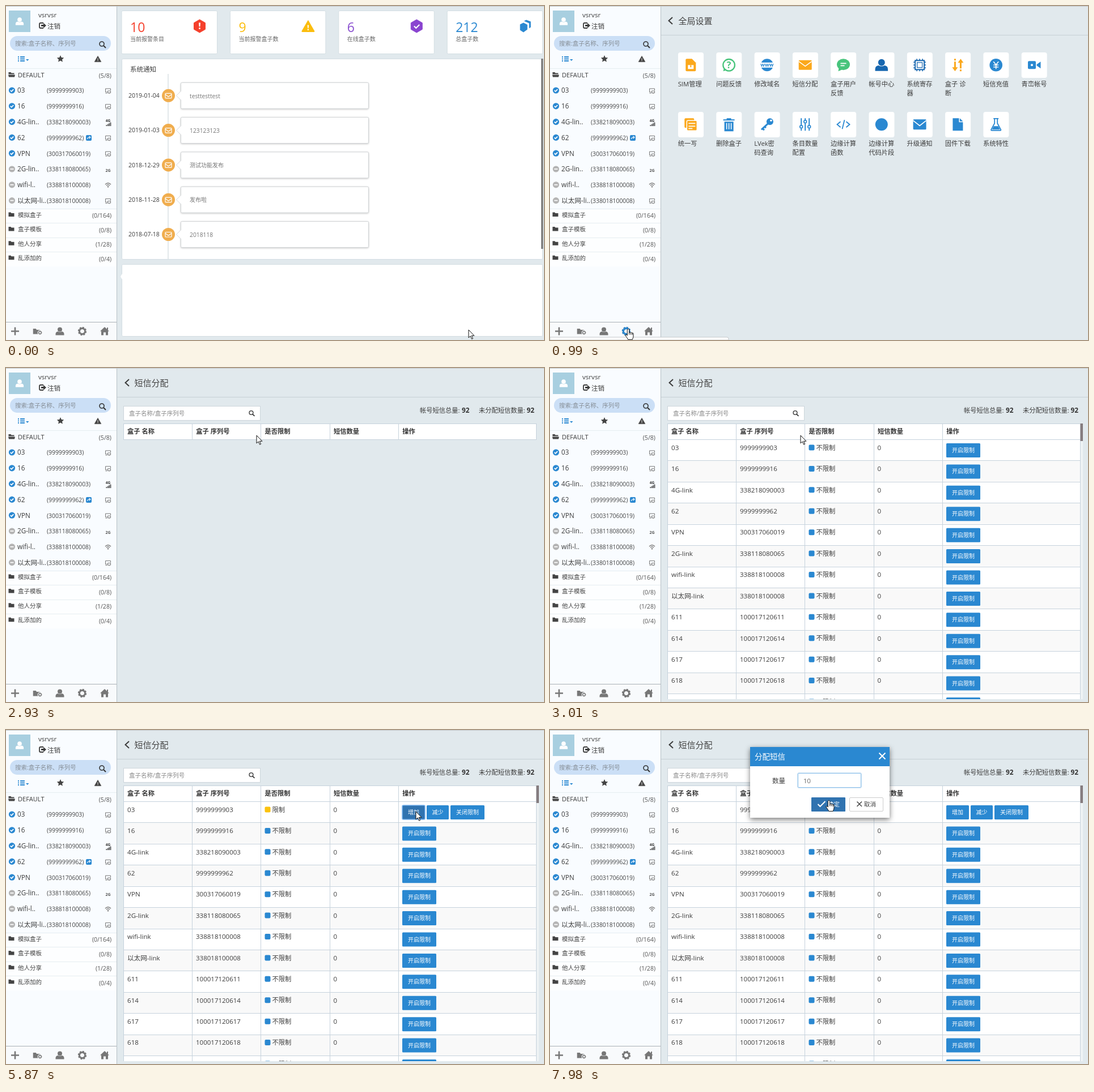
Animation, 949 px wide and 590 px high, one loop 8 s. Source, as an HTML page:

```html
<!DOCTYPE html>
<html lang="zh">
<head>
<meta charset="utf-8">
<title>短信分配</title>
<style>
html, body { margin: 0; width: 100%; height: 100%; overflow: hidden; background: #e1e9ed; }
svg { display: block; position: absolute; left: 0; top: 0; }
text { font-family: "Open Sans", "Noto Sans CJK SC", "Noto Sans CJK", sans-serif; white-space: pre; }
.line { fill: none; }
.card { fill: #fff; stroke: #d3dde2; }
.shade { filter: drop-shadow(0 1px 1.5px #0003); }
.deep { filter: drop-shadow(0 3px 5px #0008); }
</style>
</head>
<body>
<svg id="stage" width="949" height="590" viewBox="0 0 949 590"></svg>
<script>
const LOOP = 8000;
const BLUE = '#2a88d1', HOVER = '#3073b0', ORANGE = '#fba81c', GREEN = '#48c47c', INK = '#3c3c3c', GREY = '#777';

// Drawing helpers: text is placed by its vertical middle, icons by their centre.
const text = (x, y, s, size = 11.25, fill = INK, more = '') =>
  `<text x="${x}" y="${y + size * .37}" font-size="${size}" fill="${fill}" ${more}>${s}</text>`;
const rect = (x, y, w, h, fill, more = '') =>
  `<rect x="${x}" y="${y}" width="${w}" height="${h}" fill="${fill}" ${more}/>`;
const path = (d, fill, more = '') => `<path d="${d}" fill="${fill}" ${more}/>`;
const line = (d, color, width = 1, more = '') =>
  `<path class="line" d="${d}" stroke="${color}" stroke-width="${width}" ${more}/>`;
const disc = (r, fill, x = 0, y = 0) => `<circle cx="${x}" cy="${y}" r="${r}" fill="${fill}"/>`;
const ring = (r, color, width, more = '') =>
  `<circle class="line" r="${r}" stroke="${color}" stroke-width="${width}" ${more}/>`;
const at = (x, y, body, scale = 1) => `<g transform="translate(${x} ${y}) scale(${scale})">${body}</g>`;
const group = (id, body) => `<g id="${id}">${body}</g>`;
const MID = 'text-anchor="middle" ', END = 'text-anchor="end" ', BOLD = 'font-weight="700"';

// Icons
const gear = c => ring(5, c, 2.8) + ring(6.6, c, 2.2, 'stroke-dasharray="3.2 1.984"');
const user = c => disc(4, c, 0, -3) + path('M-7.500 7v-2q0-4 4-4.500q3.500 2 7 0q4 .5 4 4.500v2z', c);
const lens = c => ring(4, c, 1.6) + line('M3 3l4 4', c, 2);
const folder = c => path('M-5-4h4l1 1.500h5v6h-10z', c);
const mail = (w, h, fill, ink) => rect(-w / 2, -h / 2, w, h, fill, 'rx="1.500"') +
  line(`M${-w / 2} ${-h / 2 + 2}L0 ${h * .12}L${w / 2} ${-h / 2 + 2}`, ink, 1.5);
const back = (x, y) => line(`M${x + 7} ${y - 6}l-6.500 6l6.500 6`, INK, 2);
const alertMark = c => path('M-1.500-6h3l-.6 7h-1.800z', c) + disc(1.5, c, 0, 4);
const warn = (c, ink) => path('M0-10L11 9q.5 1-1 1h-20q-1.500 0-1-1z', c, `stroke="${c}" stroke-linejoin="round"`) + at(0, 3, alertMark(ink), .8);
const hexagon = c => path('M0-11.500L10-5.700V5.700L0 11.500L-10 5.700V-5.700z', c, `stroke="${c}" stroke-linejoin="round"`);
const screen = line('M-1.500 2.500h-3v-6h9v3M-4.500 4.500h3M-.5.500h5v3.500h-5zM2 4v1.500', GREY);
const wifi = line('M-5-1q5-5 10 0M-3 1q3-3 6 0', GREY, 1.3) + disc(1.2, GREY, 0, 3);
const mobile = text(0, -3, '4G', 6.5, '#333', MID + BOLD) +
  [0, 1, 2, 3].map(i => rect(-3.5 + i * 2.4, 5 - i * 1.5, 1.6, 2 + i * 1.5, '#444')).join('');
const slow = text(0, 2, '2G', 7, '#555', MID + BOLD);

const devices = [
  ['03', '9999999903', screen], ['16', '9999999916', screen],
  ['4G-link', '338218090003', mobile, '4G-lin..'], ['62', '9999999962', screen],
  ['VPN', '300317060019', screen], ['2G-link', '338118080065', slow, '2G-lin..'],
  ['wifi-link', '338818100008', wifi, 'wifi-l..'], ['以太网-link', '338018100008', screen, '以太网-li..'],
];

function sidebar() {
  let s = rect(0, 0, 195, 590, '#f9fcff') + line('M195.500 0V590', '#b7c0c6');
  s += rect(5, 8, 38, 38, '#a8cfe0') + at(24, 27, user('#fff'), .95);
  s += text(57, 16, 'vsrvsr', 11.6) + text(73, 36, '注销', 11.5);
  s += line('M66 30h-5q-2 0-2 2v5q0 2 2 2h5', INK, 1.8) + path('M62 33h4v-3l5 4.500l-5 4.500v-3h-4z', INK);
  s += rect(7, 53, 178, 26, '#cbdff6', 'rx="13"') + text(16, 66, '搜索:盒子名称、序列号', 10.5, '#858d95');
  s += at(169, 67, lens('#333'));
  s += line('M21 90h2M25 90h8M21 93.500h2M25 93.500h8M21 97h2M25 97h8', BLUE, 1.8) + path('M35 94h5.500l-2.700 3z', BLUE);
  s += path('M96 87l1.800 4l4.400.5l-3.200 3l.9 4.300l-3.900-2.200l-3.900 2.200l.9-4.300l-3.200-3l4.400-.5z', '#444');
  s += at(162, 93.5, warn('#444', '#fff'), .52);
  s += line('M0 110.500H195', '#e6edf1') + rect(0, 358, 195, 102, '#fdfeff');
  s += path('M4.500 117h4l1 1.500h5v2h-10zM4 121.500h12l-1 4h-10z', '#444');
  s += text(21, 122, 'DEFAULT', 11.1) + text(186, 123, '(5/8)', 10.6, '#555', END);
  devices.forEach(([name, serial, icon, brief], i) => {
    const y = 149 + 27.8 * i, on = i < 5;
    s += at(10.5, y, disc(5.6, on ? BLUE : '#b4b4b4') + line(on ? 'M-2.800 0l2 2l3.600-3.800' : 'M-3 0h6', '#fff', 1.7));
    s += text(20, y, brief || name, 11.7) + text(72, y + .5, `(${serial})`, 10.35, '#444') + at(180, y + .5, icon);
  });
  s += rect(141, 228, 10, 10, BLUE, 'rx="2"') + line('M143.500 235q0-3 4-3M146.500 230l2.500 2l-2.500 2', '#fff', 1.2);
  [['模拟盒子', '0/164'], ['盒子模板', '0/8'], ['他人分享', '1/28'], ['乱添加的', '0/4']].forEach(([name, count], i) => {
    const y = 369 + 25.4 * i;
    s += line(`M0 ${Math.round(y - 11) + .5}H195`, '#e6edf1') + at(9.5, y - .5, folder('#444'));
    s += text(21, y, name, 10.5, '#444') + text(186, y + 1.5, `(${count})`, 10.5, '#555', END);
  });
  s += rect(0, 559, 195, 31, '#f8fafc') + line('M0 558.500H195', '#a9b0b5');
  s += line('M9 574.500h14M16 567.500v14', GREY, 2.6);
  s += at(54, 575, folder(GREY), 1.25) + at(60, 577, disc(4.4, '#f8fafc') + at(0, 0, gear(GREY), .45));
  s += at(95, 574.5, user(GREY)) + at(134.5, 574.5, gear(GREY));
  s += group('gearOn', at(134.5, 574.5, gear(BLUE)));
  s += path('M174 567l8 7.500h-2v7h-4v-5h-4v5h-4v-7h-2zM178 568h2v4h-2z', GREY);
  return s;
}

function home() {
  const cards = [
    ['10', '当前报警条目', '#f5402c', hexagon('#f5402c') + alertMark('#fff')],
    ['9', '当前报警盒子数', '#fbbd0d', warn('#fbbd0d', '#fff')],
    ['6', '在线盒子数', '#8a4fd0', hexagon('#8a44d0') + line('M-4.500 0l3.500 3.500l6-6', '#fff', 2)],
    ['212', '总盒子数', BLUE, path('M2-11l8 3v10l-3 2v-9l-9-4z', BLUE) + path('M-3-6l7 3.500v8.500l-7 5l-6-4v-10z', BLUE)],
  ];
  let s = '';
  cards.forEach(([n, label, color, icon], i) => {
    const x = 204 + 191.4 * i;
    s += `<rect class="card" x="${x}" y="8.500" width="168.500" height="76" rx="2"/>`;
    s += text(x + 15, 37, n, 23, color) + text(x + 15, 58, label, 10, '#666') + at(x + 137.5, 35.5, icon);
  });
  s += '<rect class="card" x="204.500" y="93.500" width="742" height="354" rx="2"/>';
  s += rect(944, 93, 3.5, 336, '#7d7d7d') + text(219, 112, '系统通知', 11.5) + rect(285, 120, 2, 327, '#e3e8eb');
  [['2019-01-04', 'testtesttest'], ['2019-01-03', '123123123'], ['2018-12-29', '测试功能发布', 10],
   ['2018-11-28', '发布啦', 10], ['2018-07-18', '2018118']].forEach(([date, note, size = 10.3], i) => {
    const y = 158.3 + 61.3 * i;
    s += `<g class="shade">${rect(308.5, y - 23, 331, 46, '#fff', 'rx="2" stroke="#cfd2d4"')}</g>`;
    s += path(`M309 ${y - 8}l-8 8l8 8z`, '#fff') + line(`M308.500 ${y - 8}l-8 8l8 8`, '#d5d8da');
    s += text(216, y, date, 10.5) + text(324, y + .5, note, size, '#777');
    s += at(286.5, y, disc(11.5, '#f0ad4e') + rect(-5.5, -4, 11, 8.5, 'none', 'rx="1" stroke="#fff" stroke-width="1.200"') +
      line('M-5.500-2L0 2L5.500-2', '#fff', 1.2));
  });
  s += '<rect class="card" x="204.500" y="456.500" width="742" height="127" rx="2"/>';
  return s + path('M205 473l-3 5l3 5z', '#fff');
}

const header = (x, title) => back(x, 26) + line('M196 51.500H949', '#c7d0d5') + text(226.5, 26, title, 15, '#444');

function settings() {
  const B = BLUE, N = '#1767b0', O = ORANGE;
  const tiles = [
    ['SIM管理', path('M-9-9q0-2 2-2h9l7 7v13q0 2-2 2h-14q-2 0-2-2z', O) + rect(-5, 0, 10, 7, '#fff') + rect(-1, 0, 2, 4, O)],
    ['问题反馈', ring(10.3, GREEN, 2.3) + text(0, 0, '?', 16, GREEN, MID + BOLD) + path('M-9 6l-1 5l6-2z', GREEN)],
    ['修改域名', disc(11, B) + rect(-12, -4.5, 24, 9, '#fff') + text(0, -.8, 'www', 9, B, MID + BOLD) + line('M-9-5.500h18M-9 5.500h18', B, 1.4)],
    ['短信分配', mail(23, 17, O, '#fff')],
    ['盒子用户|反馈', `<ellipse rx="11.500" ry="10" cy="-1" fill="${GREEN}"/>` + path('M-8 5l-1 6l7-3z', GREEN) + line('M-5-3h10M-5 1h7', '#fff', 1.8)],
    ['帐号中心', at(0, 0, user(N), 1.5)],
    ['系统寄存|器', rect(-8, -8, 16, 16, 'none', `stroke="${N}" stroke-width="2"`) + rect(-4.5, -4.5, 9, 9, 'none', `stroke="${N}" stroke-width="1.200"`) +
      line('M-5-8v-3M0-8v-3M5-8v-3M-5 8v3M0 8v3M5 8v3M-8-5h-3M-8 0h-3M-8 5h-3M8-5h3M8 0h3M8 5h3', N, 1.6)],
    ['盒子 诊|断', line('M-5-11v3M-5-6v11M5 11v-3M5 6v-11', O, 3) + path('M-10 4h10l-5 7zM0-4h10l-5-7z', O)],
    ['短信充值', disc(11.3, B) + line('M-4.500-6l4.500 5.500l4.500-5.500M0-.5v7.500M-4.500 0h9M-4.500 3.500h9', '#fff', 1.6)],
    ['青峦帐号', rect(-11, -7, 14, 14, B, 'rx="2"') + path('M4.500-1l7-5v12l-7-5z', B) + disc(2, '#fff', -4)],
    ['统一写', rect(-11, -11, 17, 17, O, 'rx="2"') + rect(-7, -7, 18, 18, O, 'rx="2" stroke="#fff" stroke-width="1.500"') + line('M-4-2h12M-4 3h12M-4 7h7', '#fff', 1.8)],
    ['删除盒子', path('M-10-9h6v-2h8v2h6v2h-20z', B) + rect(-8, -5, 16, 17, B) + line('M-4-2.500v11M0-2.500v11M4-2.500v11', '#fff', 1.6)],
    ['LVek密|码查询', disc(6, B, 5, -5) + disc(1.8, '#fff', 7, -7) + line('M2-2l-12 11M-8 7l3 3M-4 4l2 2', B, 3)],
    ['条目数量|配置', line('M-7-11v12M-7 7v4M0-11v3M0-2v13M7-11v12M7 7v4', B, 2) + at(-7, 4, ring(2.4, B, 1.7)) + at(0, -5, ring(2.4, B, 1.7)) + at(7, 4, ring(2.4, B, 1.7))],
    ['边缘计算|函数', line('M-5-5l-6 5l6 5M5-5l6 5l-6 5M2-8l-4 16', B, 1.8)],
    ['边缘计算|代码片段', disc(11, B)],
    ['升级通知', mail(23, 18, B, '#fff')],
    ['固件下载', path('M-9-11h11v7h7v15h-18z', B) + path('M3.500-11l5.500 5.500h-5.500z', B)],
    ['系统特性', line('M-4.500-10.500h9M-2.500-10v8l-6 11q-.5 1.500 1 1.500h15q1.500 0 1-1.500l-6-11v-8', B, 1.8) + path('M-4 3h8l3 6h-14z', B)],
  ];
  let s = header(209, '全局设置');
  tiles.forEach(([label, icon], i) => {
    const x = 226 + 67.3 * (i % 10), y = i < 10 ? 82 : 187;
    s += rect(x, y, 45, 45, '#fff', 'rx="4"') + at(x + 22.3, y + 22.3, icon);
    label.split('|').forEach((part, k) => s += text(x - .3, y + 56 + 15.5 * k, part));
  });
  return s;
}

const button = (x, y, w, label, fill = BLUE) =>
  rect(x, y, w, 25, fill, 'rx="1.500"') + text(x + w / 2, y + 12.3, label, 10, '#fff', MID);
const limit = (y, label, color) => rect(456.5, y - 5, 10, 10, color, 'rx="2"') + text(469.5, y, label);

function table() {
  const list = devices.concat([611, 614, 617, 618, 619].map(n => [n, '100017120' + n]));
  const grid = end => line([207.5, 328.5, 449.5, 571.5, 692.5, 935.5].map(x => `M${x} 98V${end}`).join(''), '#c6d2dc');
  let head = rect(207, 98, 729, 28, '#fff') + line('M207 98.500H936M207 126.500H936', '#c6d2dc') + grid(126);
  ['盒子 名称', '盒子 序列号', '是否限制', '短信数量', '操作'].forEach((h, i) =>
    head += text(214 + 121.3 * i, 112, h, 11.25, '#333', BOLD));

  let rows = rect(207, 127, 729, 458, '#fff');
  list.forEach(([name, serial], i) => {
    const d = 37.42 * i, y = 140.5 + d, top = Math.round(126 + d);
    const open = fill => button(699, 133 + d, 60, '开启限制', fill);
    if (i % 2) rows += rect(207, top, 729, 37.4, '#f9f9f9');
    rows += line(`M207 ${top + .5}H936`, '#c6d2dc');
    rows += text(214, y, name, 11.6) + text(335, y, serial, 11.5) + text(577.5, y, '0', 11.5);
    const free = limit(y, '不限制', BLUE) + open() + (i < 2 ? group('openHover' + i, open(HOVER)) : '');
    rows += i ? free : group('rowOpen', free);
  });
  rows += group('rowLimited', limit(140.5, '限制', '#fbc20e') +
    button(699, 133, 40, '增加') + button(742, 133, 39, '减少') + button(784, 133, 60, '关闭限制') +
    group('addHover', button(699, 133, 40, '增加', HOVER)) +
    group('lessHover', button(742, 133, 39, '减少', HOVER)) +
    group('addRing', rect(699, 133, 40, 25, 'none', 'rx="2" stroke="#7ab4ee" stroke-width="1.600"')));
  rows = `<g clip-path="url(#body)">${rows}${grid(585)}</g>` +
    rect(936, 98, 4, 487, '#eef2f4') + rect(935.5, 98, 4.5, 31, '#857c7f');
  return head + group('rows', rows);
}

function dialog() {
  const box = rect(353, 30, 246, 125, '#fff') + rect(353, 30, 246, 34, BLUE);
  const ok = fill => rect(461, 119, 60, 25, fill, 'rx="1.500"') +
    line('M472.500 131l4 4l9-9', '#fff', 2) + text(490, 131.5, '确定', 10.5, '#fff');
  return `<g class="deep">${box}</g>` + text(361, 47.5, '分配短信', 13.5, '#fff') +
    line('M580.500 40.500l11 11M591.500 40.500l-11 11', '#fff', 2) + text(392, 89.5, '数量', 11.5) +
    rect(437.5, 76.5, 111, 25, '#fff', 'rx="1.500" stroke="#8cc0ea"') +
    rect(436.5, 75.5, 113, 27, 'none', 'rx="2" stroke="#2a88d133"') +
    text(447, 89.5, '1', 11.2, '#666') + group('zero', text(453.4, 89.5, '0', 11.2, '#666')) +
    group('caretA', rect(453, 82, 1, 14, '#222')) + group('caretB', rect(459, 82, 1, 14, '#222')) +
    ok(BLUE) + group('okHover', ok(HOVER)) +
    rect(528.5, 119.5, 59, 24, '#fff', 'rx="1.500" stroke="#ccc"') +
    line('M541.500 126.500l8.500 8.500M550 126.500l-8.500 8.500', INK, 1.4) + text(554, 131.5, '取消', 10.5);
}

const sms = () => header(210, '短信分配') +
  rect(207.5, 67.5, 241, 25, '#fff', 'stroke="#ccd5db"') + text(217, 80, '盒子名称/盒子序列号', 10.5, '#888') +
  at(432.5, 79, lens('#333'), .85) +
  text(730, 75, '帐号短信总量: ') + text(804, 75, '92', 11.8, '#333', BOLD) +
  text(834, 75, '未分配短信数量: ') + text(918.5, 75, '92', 11.8, '#333', BOLD) +
  table() + group('dialog', dialog());

const cursor = group('arrow', path('M0 0V14l3.200-3l2.400 5.300l2-.9l-2.300-5.100h4.600z', '#fff', 'stroke="#111"')) +
  group('hand', path('M-1.700 12V1.500Q0-1 1.700 1.500V7Q3 5.500 4.300 7Q5.800 6 7 7.700Q9 7 9 9V14Q8.500 17 7 19.500H0Q-2 16-5 12Q-4.500 9-1.700 12z', '#fff', 'stroke="#111"') +
    line('M1.700 7v3.500M4.300 7.500v3M7 8v3', '#111')) +
  group('ibeam', line('M-3-8h2.500l.5.500l.5-.5h2.500M0-7.500v15M-3 8h2.500l.5-.5l.5.5h2.500', '#222'));

stage.innerHTML = '<clipPath id="body"><rect x="207" y="127" width="730" height="458"/></clipPath>' +
  rect(0, 0, 949, 590, '#e1e9ed') + group('home', home()) + group('settings', settings()) + group('sms', sms()) +
  sidebar() + rect(0, 0, 949, 1, '#c3c9cc') +
  group('status', path('M0 590V585H312q3 0 3 3v2z', '#fff', 'stroke="#c4c8cb"')) + group('cursor', cursor);

// Visible spans in ms
const spans = {
  home: [[0, 920]], settings: [[920, 2850]], sms: [[2850, LOOP]], rows: [[3010, LOOP]],
  status: [[920, 1450]], gearOn: [[840, 2620]],
  rowOpen: [[0, 4250]], openHover0: [[3860, 4250]], openHover1: [[3540, 3780]], rowLimited: [[4250, LOOP]],
  addHover: [[4250, 4480], [5335, 5950]], lessHover: [[5110, 5335]], addRing: [[5720, 5950]],
  dialog: [[5950, LOOP]], caretA: [[5950, 6490], [7020, 7190]], zero: [[7190, LOOP]], caretB: [[7190, 7730]],
  okHover: [[7980, LOOP]],
  arrow: [[0, 840], [1370, 2230], [2850, 3540], [3780, 3860], [4480, 5030], [5870, 7730], [7880, 7980]],
  hand: [[840, 1370], [2230, 2850], [3540, 3780], [3860, 4480], [5030, 5870], [7980, LOOP]],
  ibeam: [[7730, 7880]],
};

// Pointer moves: first jump, last jump, number of jumps, x and y reached
const moves = [
  [70, 140, 2, 535, 530], [450, 840, 6, 138, 570], [1370, 1760, 6, 533, 180], [1840, 2150, 5, 477, 127],
  [2230, 2470, 4, 448, 113], [2550, 2700, 3, 442, 119], [3090, 3620, 8, 728, 179], [3700, 3950, 4, 728, 150],
  [4170, 4400, 4, 709, 150], [4480, 4720, 4, 616, 145], [4870, 5110, 4, 762, 145], [5190, 5410, 4, 723, 144],
  [5950, 6490, 8, 522, 127], [7570, 7730, 3, 531, 94], [7880, 7980, 2, 492, 124],
];

// Changes land just before their nominal time.
const pct = ms => Math.max(0, ms - 4) / LOOP * 100 + '%';
const ease = u => u * u * (3 - 2 * u);
const place = (ms, x, y) => `${pct(ms)}{transform:translate(${x}px,${y}px)}`;

function pointerKeys() {
  let x = 816, y = 572, keys = place(0, x, y);
  for (const [from, to, n, nx, ny] of moves) {
    for (let k = 1; k <= n; k++) {
      const e = ease(k / n);
      keys += place(from + (to - from) * (k - 1) / (n - 1), x + (nx - x) * e, y + (ny - y) * e);
    }
    [x, y] = [nx, ny];
  }
  return keys;
}

function spanKeys(list) {
  const first = list[0][0] ? '0%{opacity:0}' : '';
  return first + list.map(([a, b]) => `${pct(a)}{opacity:1}` + (b < LOOP ? `${pct(b)}{opacity:0}` : '')).join('');
}

const animate = (id, keys) => `#${id}{animation:${id} ${LOOP}ms step-end infinite}@keyframes ${id}{${keys}}`;
document.head.appendChild(document.createElement('style')).textContent =
  Object.entries(spans).map(([id, list]) => animate(id, spanKeys(list))).join('') + animate('cursor', pointerKeys());
</script>
</body>
</html>
```
